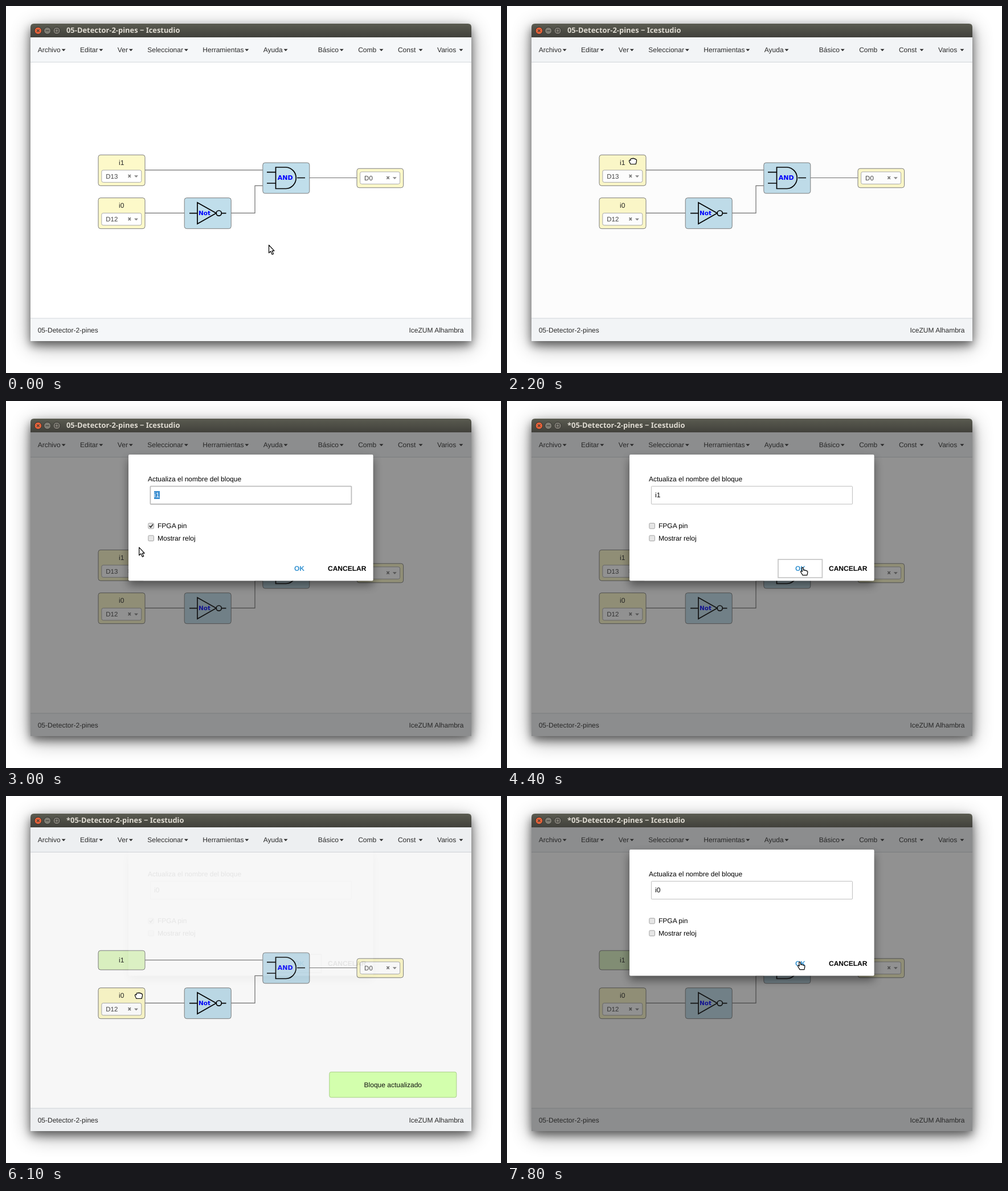
These frames come from a looping animation (869x644 px, 8 s). An HTML page:

```html
<!DOCTYPE html>
<html lang="es">
<head>
<meta charset="utf-8">
<title>Icestudio</title>
<style>
  html, body { margin: 0; width: 100%; height: 100%; overflow: hidden; background: #fff; }
  svg { display: block; font: 12px "Liberation Sans", Arial, sans-serif; text-rendering: geometricPrecision; }
  .title { font: bold 12.9px "Noto Sans", "Open Sans", sans-serif; fill: #dfdbd2; }
  .gate { font: bold 11px "DejaVu Sans", sans-serif; fill: #00f; text-anchor: middle; }
  .mid { text-anchor: middle; }
  .bold { font-weight: bold; }
  .dark { fill: #2b2b2b; }
  .ink { fill: none; stroke: #000; stroke-width: 1.7; }
  .wire { fill: none; stroke: #707070; stroke-width: 1.2; }
  .skin { fill: #fff; stroke: #000; stroke-width: 1.2; stroke-linejoin: round; }
</style>
</head>
<body>
<svg id="stage" width="869" height="644" viewBox="0 0 869 644">
  <defs>
    <linearGradient id="bar" x2="0" y2="1">
      <stop stop-color="#5a5b50"/><stop offset="1" stop-color="#3c3b37"/>
    </linearGradient>
  </defs>
</svg>
<script>
const LOOP = 8000, STEP = 100;
const stage = document.getElementById('stage');
const pen = document.createElement('canvas').getContext('2d');
pen.font = '12px "Liberation Sans", Arial, sans-serif';

// Markup helpers
const rect = (x, y, w, h, fill, stroke = 'none', r = 0, extra = '') =>
  `<rect x="${x}" y="${y}" width="${w}" height="${h}" rx="${r}" fill="${fill}" stroke="${stroke}" ${extra}/>`;
const text = (x, y, s, extra = '') => `<text x="${x}" y="${y}" ${extra}>${s}</text>`;
const path = (d, extra) => `<path d="${d}" ${extra}/>`;
const caret = (x, y, fill) => path(`M${x - 3.5} ${y}h7l-3.5 3.7z`, `fill="${fill}"`);
const shadow = (x, y, w, h, blur, alpha) =>
  rect(x, y, w, h, '#000', 'none', 4, `style="filter:blur(${blur}px)" opacity="${alpha}"`);

// Menu entries follow each other at a constant gap
function menu(x, labels) {
  return labels.map(label => {
    const end = x + pen.measureText(label).width;
    const item = text(x, 81, label, 'class="dark"') + caret(end + 5.4, 75.6, '#2b2b2b');
    x = end + 34.4;
    return item;
  }).join('');
}

function picker(x, y, value) {
  return rect(x, y, 70, 21.4, '#fff', '#aaa', 3) +
    text(x + 7.5, y + 14.6, value, 'fill="#444" font-size="11.5"') +
    path(`M${x + 46.8} ${y + 8}l4.4 4.8m0-4.8l-4.4 4.8`, 'stroke="#777" stroke-width="1.7"') +
    caret(x + 60.7, y + 9.3, '#888');
}

// Every block is also an area where the pointer turns into a hand
const grips = [];
function block(x, y, w, h, fill) {
  grips.push([x, y, w, h]);
  return rect(x, y, w, h, fill, '#7d7d7d', 4);
}

function pinBlock(y, label, pin) {
  return block(162, y, 82, 54, '#fdf9c9') +
    text(202.7, y + 17.3, label, 'class="mid" fill="#222"') + picker(167.8, y + 26.7, pin);
}

function button(i, fill, mark) {
  const x = 56.3 + i * 16.35;
  return `<circle cx="${x}" cy="43.3" r="6.2" fill="${fill}" stroke="#33322e"/>` +
    path(`M${x} 43.3${mark}`, 'fill="none" stroke="#3c3b37" stroke-width="1.1"');
}

function checkbox(y, label, tick = '') {
  return rect(249.8, y, 9.6, 9.6, '#e6e6e6', '#a3a3a3', 1.5) + tick + text(266, y + 8.9, label);
}

const frame =
  shadow(43, 40, 774, 556, 18, .4) + shadow(43, 39, 774, 556, 8, .5) +
  path('M43 60V37q0-6 6-6H811q6 0 6 6V60z', 'fill="url(#bar)"') +
  button(0, '#e8633a', 'm-2.2-2.2l4.4 4.4m0-4.4l-4.4 4.4') +
  button(1, '#7f7d74', 'm-3 0h6') +
  button(2, '#7f7d74', 'm-2.5-2.5h5v5h-5z') +
  '<text id="title" class="title" x="106" y="47.3"></text>' +
  rect(43, 55, 774, 533, '#fff') +
  rect(43, 55, 774, 43, '#f5f7f9') + rect(43, 98, 774, 1, '#d3d7dc') +
  rect(43, 548, 774, 40, '#f5f7f9') + rect(43, 547.5, 774, 1, '#d3d7dc') +
  menu(55.7, ['Archivo', 'Editar', 'Ver', 'Seleccionar', 'Herramientas', 'Ayuda']) +
  menu(547.8, ['Básico', 'Comb\u00a0', 'Const\u00a0', 'Varios\u00a0']) +
  text(55.7, 572.5, '05-Detector-2-pines', 'class="dark"') +
  text(803.5, 572.5, 'IceZUM Alhambra', 'class="dark" text-anchor="end"');

const circuit =
  path('M244 287.8H451M244 363.4H313M395 363.4H437V315.4H451M532 301.5H616', 'class="wire"') +
  `<g id="pin">${pinBlock(261.3, 'i1', 'D13')}</g>` +
  `<g id="port">${block(162, 271.2, 82, 33.8, '#e0f7c5')}${text(202.7, 292.3, 'i1', 'class="mid" fill="#222"')}</g>` +
  pinBlock(336.7, 'i0', 'D12') +
  block(313.2, 336.7, 82, 54, '#c0deeb') +
  path('M322 363.6H336M378.5 363.6H386.5M336 345V382.3L369 363.6z', 'class="ink"') +
  '<circle class="ink" cx="373.7" cy="363.6" r="4.6"/>' +
  text(348.5, 367.4, 'Not', 'class="gate" style="font-size:10.5px"') +
  block(450.8, 275, 82, 53.8, '#c0deeb') +
  path('M458 291.6H473M458 311H473M511 301.5H525M473.5 283H491.8A18.8 18.8 0 0 1 491.8 320.5H473.5z', 'class="ink"') +
  text(490.3, 305.4, 'AND', 'class="gate"') +
  block(616, 285.2, 81.6, 33.6, '#fdf9c9') + picker(621.6, 291, 'D0');

const dialog =
  shadow(215, 102, 429.6, 221, 8, .45) +
  rect(215, 94, 429.6, 221.6, '#fff', 'none', 2) +
  text(249, 141.2, 'Actualiza el nombre del bloque') +
  rect(253.4, 149.6, 353, 31.4, '#fff', '#bdbdbd', 1, 'id="field"') +
  rect(260, 158, 10, 14, '#3d8fd1', 'none', 0, 'id="mark"') +
  '<text id="name" x="260" y="169.3"></text>' +
  checkbox(214.4, 'FPGA pin', path('M251.8 219l2.2 2.6 4-5.4', 'id="tick" fill="none" stroke="#333" stroke-width="1.7"')) +
  checkbox(236, 'Mostrar reloj') +
  rect(476, 278, 77.4, 32, 'none', '#c6c6c6', 0, 'id="ring" stroke-width="1.7"') +
  text(515, 298.2, 'OK', 'class="mid bold" fill="#3593d2"') +
  text(565, 298.2, 'CANCELAR', 'class="bold"');

const notice = rect(0, 0, 223, 44.6, '#d3ffad', '#a8cf88', 3) +
  text(111.5, 26.6, 'Bloque actualizado', 'class="mid" fill="#111"');

// Pointer shapes, drawn from their hot spot
const shapes = {
  arrow: 'M.5.5V14.3L3.7 11.4 6.2 17 8.5 16 6.1 10.6H10z',
  hand: 'M-4.2 5.5C-4.6 3-6.6 2-6.5-.3-6.3-1.7-4.8-2-4-1V-3C-3.6-4.9-1.7-4.9-1.2-3.6-.6-5.4 1.6-5.2 1.9-3.6 2.6-4.7 4.3-4.3 4.4-2.8 5.2-3.4 6.5-2.7 6.5-1.4 6.6 2 5.5 3 5.2 5.5z',
  point: 'M.9 13.7C.3 11-2.6 9.5-2.4 7.3-2.2 6-.6 6.2.3 7.3L-.4 1.2C-.4-.3 1.7-.3 2 1L2.8 5.2C3.5 4.3 5.1 4.5 5.4 5.6 6.1 4.9 7.5 5.2 7.7 6.3 8.6 5.8 9.8 6.4 9.8 7.6 9.9 10.5 9.1 11.5 8.8 13.7z'
};

stage.insertAdjacentHTML('beforeend', frame + circuit +
  rect(43, 55, 774, 533, '#252525', 'none', 0, 'id="shade"') +
  `<g id="dialog">${dialog}</g><g id="notice">${notice}</g><path id="cursor" class="skin"/>`);

const el = {};
stage.querySelectorAll('[id]').forEach(n => el[n.id] = n);

// Moments of the story
const OPEN = 2200, READY = 3000, UNTICK = 3300, PRESS = 4400, CLOSE = 4600;
const REOPEN = 6100, READY2 = 6500, UNTICK2 = 7200;

// Pointer moves: start, steps, goal
const moves = [
  [600, 9, 240, 272], [1500, 2, 221, 272], [READY, 3, 268, 212], [3700, 6, 518, 292],
  [5000, 2, 418.5, 315.5], [5600, 3, 233, 350], [READY2, 1, 268, 213], [7300, 6, 513, 291]
];

const steps = (t, from) => Math.floor((t - from) / STEP);
const within = (t, a, b) => t >= a && t < b;
const inside = (x, y, [l, top, w, h]) => x >= l && x <= l + w && y >= top && y <= top + h;
const show = (node, on) => node.style.display = on ? '' : 'none';

// How far the modal layer has faded in, 0 to 1
function openness(t) {
  if (t < OPEN) return 0;
  if (t < READY) return Math.min(.82, .02 + .4 * steps(t, OPEN));
  if (t < CLOSE) return 1;
  if (t < REOPEN) return Math.max(0, .57 - .43 * steps(t, CLOSE));
  return t < READY2 ? .07 : 1;
}

function pointerAt(t) {
  let x = 461, y = 419;
  for (const [start, count, goalX, goalY] of moves) {
    if (t < start) break;
    const p = Math.min(1, (steps(t, start) + 1) / count);
    const ease = p * p * (3 - 2 * p);
    x += (goalX - x) * ease;
    y += (goalY - y) * ease;
  }
  return [x, y];
}

function pointerKind(t, x, y) {
  const modal = within(t, READY, 5000) || t >= READY2;
  if (modal) return inside(x, y, [475, 277, 79, 34]) ? 'point' : 'arrow';
  return grips.some(g => inside(x, y, g)) ? 'hand' : 'arrow';
}

function draw(t) {
  const open = openness(t);
  const closing = within(t, CLOSE, REOPEN);
  const veil = closing ? Math.max(0, 2 * open - 1) : open;
  const focus = within(t, OPEN, UNTICK) || within(t, READY2, UNTICK2);

  el.title.textContent = (t >= PRESS ? '*' : '') + '05-Detector-2-pines \u2212 Icestudio';
  show(el.pin, t < CLOSE);
  show(el.port, t >= CLOSE);
  el.shade.setAttribute('opacity', open / 2);

  show(el.dialog, veil > .03);
  el.dialog.setAttribute('opacity', veil);
  el.name.textContent = t < REOPEN ? 'i1' : 'i0';
  el.name.setAttribute('fill', focus ? '#fff' : '#000');
  el.field.setAttribute('stroke-width', focus ? 1.8 : 1);
  show(el.mark, focus);
  show(el.tick, t < UNTICK || within(t, REOPEN, UNTICK2));
  show(el.ring, within(t, PRESS, CLOSE + STEP) || within(t, REOPEN, READY2));

  // The notice swings past its place and settles
  const swing = Math.sin(Math.PI * Math.min(1, steps(t, CLOSE) / 3));
  show(el.notice, within(t, CLOSE, UNTICK2));
  el.notice.setAttribute('transform', `translate(${567.8 - 24 * swing} ${484.3 - swing})`);

  const [x, y] = pointerAt(t);
  el.cursor.setAttribute('d', shapes[pointerKind(t, x, y)]);
  el.cursor.setAttribute('transform', `translate(${x} ${y})`);
}

const begin = performance.now();
function tick() {
  draw((performance.now() - begin) % LOOP);
  requestAnimationFrame(tick);
}
tick();
</script>
</body>
</html>
```
